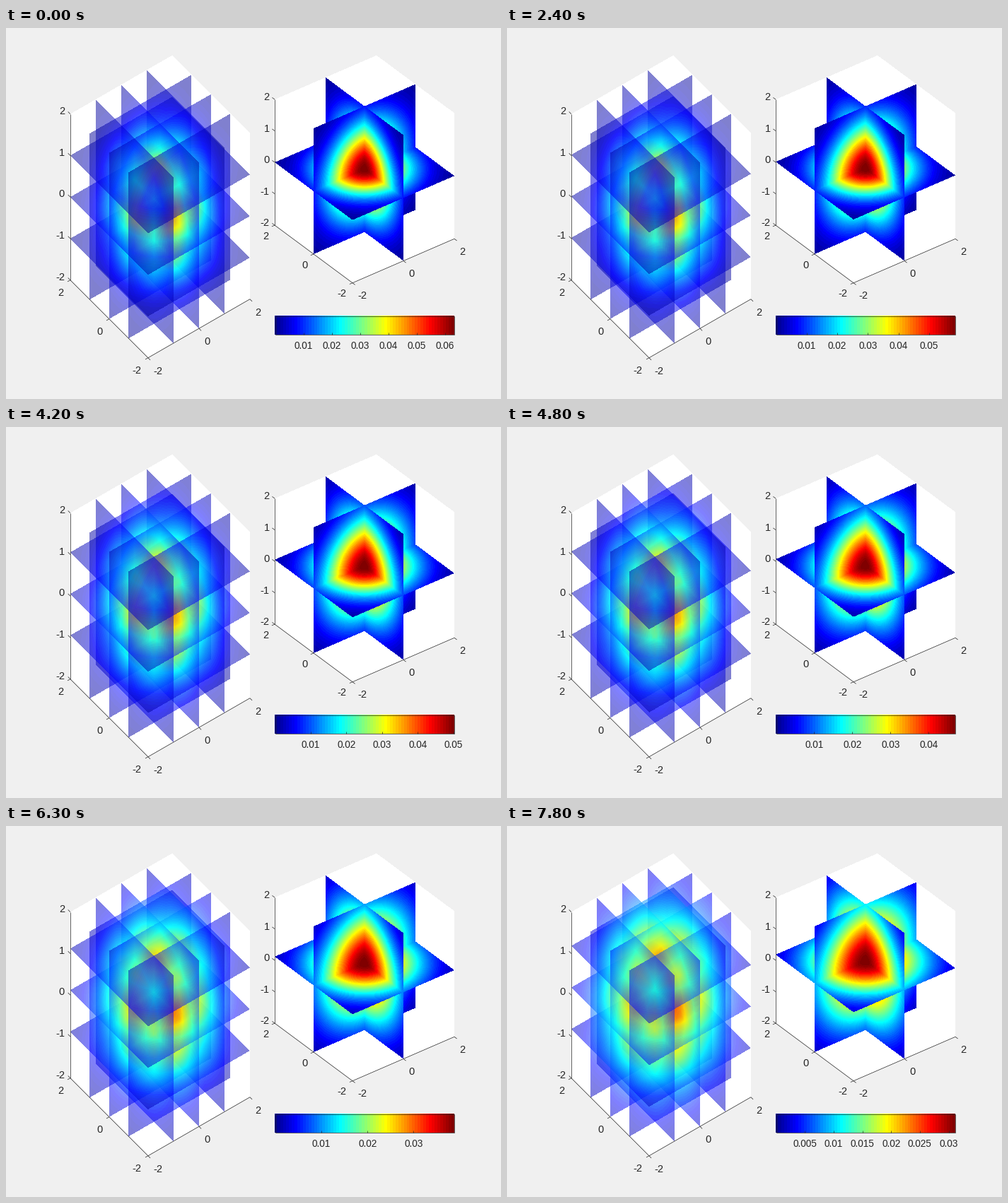
A matplotlib script for the animation above (8000 ms loop, 700 by 525 pixels).

```python
import numpy as np
import matplotlib.pyplot as plt
from matplotlib.animation import FuncAnimation

W, H, DPI = 700, 525, 100
PX = 72 / DPI
STATES, HOLD, FRAMES = 27, 3, 80
INK = (0.15, 0.15, 0.15)
BAR = (380, 633, 407, 433)          # left, right, top, bottom

plt.rcParams["font.family"] = "Liberation Sans"
fig = plt.figure(figsize=(W / DPI, H / DPI), dpi=DPI)
ax = fig.add_axes([0, 0, 1, 1])
ax.set_axis_off()


def jet(v):
    x = (np.clip(np.floor(v * 64), 0, 63) + 1) / 64
    return np.stack([np.clip(1.5 - np.abs(4 * x - c), 0, 1) for c in (3, 2, 1)], -1)


def peak(k):
    return (2 * np.pi) ** -1.5 / (1 + 0.00063 * k * k) ** 2


def variance(k):
    return 1 + 0.00083 * k * k


def drift(k):
    return 0.00027 * k * k


class Volume:
    """Gaussian density on slices of the cube [-2, 2]^3, seen in parallel projection."""

    def __init__(self, origin, ex, ey, ez, cuts, alpha):
        self.origin = np.array(origin, float)
        self.axes = np.array([ex, ey, (0, ez)], float)
        self.cuts, self.alpha = cuts, alpha
        corners = np.array([self.project(x, y, z) for x in (-2, 2)
                            for y in (-2, 2) for z in (-2, 2)])
        (x0, y0), (x1, y1) = np.floor(corners.min(0)), np.ceil(corners.max(0))
        self.window = np.s_[int(y0):int(y1) + 1, int(x0):int(x1) + 1]
        py, px = np.mgrid[self.window]
        rel = np.stack([px, py], -1) - self.origin
        xy = rel @ np.linalg.inv(self.axes[:2])
        self.base = np.concatenate([xy, np.zeros(px.shape + (1,))], -1)
        vy = ex[0] / ey[0]
        self.view = np.array([-1, vy, (ex[1] - vy * ey[1]) / ez])
        walls = [self.hit(axis, pos)[2] for axis, pos in ((0, 2), (1, 2), (2, -2))]
        self.back = np.any(walls, axis=0)

    def project(self, x, y, z):
        return self.origin + np.array([x, y, z]) @ self.axes

    def hit(self, axis, pos):
        depth = (pos - self.base[..., axis]) / self.view[axis]
        point = self.base + depth[..., None] * self.view
        return depth, point, np.all(np.abs(point) <= 2.0001, axis=-1)

    def paint(self, image, k):
        rise, var = drift(k), variance(k)
        depths, colors, alphas = [], [], []
        for axis in range(3):
            for cut in self.cuts:
                depth, p, inside = self.hit(axis, cut + rise * (axis == 2))
                r2 = p[..., 0] ** 2 + p[..., 1] ** 2 + (p[..., 2] - rise) ** 2
                depths.append(depth)
                colors.append(jet(np.exp(-r2 / (2 * var))))
                alphas.append(inside * self.alpha)
        order = np.argsort(depths, axis=0)[..., None]
        colors = np.take_along_axis(np.array(colors), order, 0)
        alphas = np.take_along_axis(np.array(alphas)[..., None], order, 0)
        out = image[self.window]
        out[self.back] = 1
        for color, a in zip(colors, alphas):
            out[:] = out * (1 - a) + color * a


def line(a, b):
    return ax.plot([a[0], b[0]], [a[1], b[1]], color=INK, lw=0.5,
                   solid_capstyle="butt", zorder=3)[0]


def label(x, y, text, size, ha):
    return ax.text(x, y + 0.36 * size, text, size=size * PX, ha=ha,
                   va="baseline", color=INK, zorder=4)


def draw_axis(vol, place, ticks, tick_dir, offset, ha):
    line(vol.project(*place(-2)), vol.project(*place(2)))
    step = np.array(tick_dir) @ vol.axes
    step *= 4.5 / np.hypot(*step)
    for t in ticks:
        p = vol.project(*place(t))
        line(p, p + step)
        label(p[0] + offset[0], p[1] + offset[1], str(t), 14.67, ha)


def draw_frame(vol, x_off, y_off, z_off):
    draw_axis(vol, lambda t: (t, -2, -2), (-2, 0, 2), (0, -1, 0), x_off, "left")
    draw_axis(vol, lambda t: (-2, t, -2), (-2, 0, 2), (-1, 0, 0), y_off, "right")
    draw_axis(vol, lambda t: (-2, 2, t), range(-2, 3), (0, 1, 0), z_off, "right")


left = Volume((217.4, 252.2), (36, -20.75), (-27.5, -27.5), -58.75, (-1, 0, 1), 0.5)
right = Volume((506.5, 199.2), (36, -15.6), (-27.5, -20.4), -44.5, (0,), 1.0)


def render(k):
    image = np.full((H, W, 3), 240 / 255)
    left.paint(image, k)
    right.paint(image, k)
    x0, x1, y0, y1 = BAR
    width = x1 - x0 + 1
    image[y0:y1 + 1, x0:x1 + 1] = jet((np.arange(width) + 0.5) / width)
    return np.round(image * 255).astype(np.uint8)


images = [render(k) for k in range(STATES)]
picture = ax.imshow(images[0], interpolation="nearest", aspect="auto")
draw_frame(left, (7, 18), (-9.5, 17), (-8, -5.2))
draw_frame(right, (7, 17), (-8.8, 14.5), (-7.5, -4))

x0, x1, y0, y1 = BAR
for a, b in (((x0, y0), (x1, y0)), ((x1, y0), (x1, y1)),
             ((x1, y1), (x0, y1)), ((x0, y1), (x0, y0))):
    line(a, b)
bar_ticks = [line((x0, y1), (x0, y1 - 3)) for _ in range(6)]
bar_labels = [label(x0, 449, "", 13.6, "center") for _ in range(6)]
ax.set_xlim(-0.5, W - 0.5)
ax.set_ylim(H - 0.5, -0.5)


def update(i):
    k = i // HOLD
    picture.set_data(images[k])
    top = peak(k)
    step = 0.005 if top < 0.035 else 0.01
    for n, (tick, text) in enumerate(zip(bar_ticks, bar_labels), 1):
        value = n * step
        x = x0 + (x1 + 1 - x0) * value / top
        shown = value <= top
        tick.set_xdata([x, x])
        tick.set_visible(shown)
        text.set_x(x)
        text.set_text(f"{value:g}" if shown else "")
    return [picture, *bar_ticks, *bar_labels]


anim = FuncAnimation(fig, update, frames=FRAMES, interval=100, repeat=True,
                     repeat_delay=0, blit=False)
plt.show()
```
